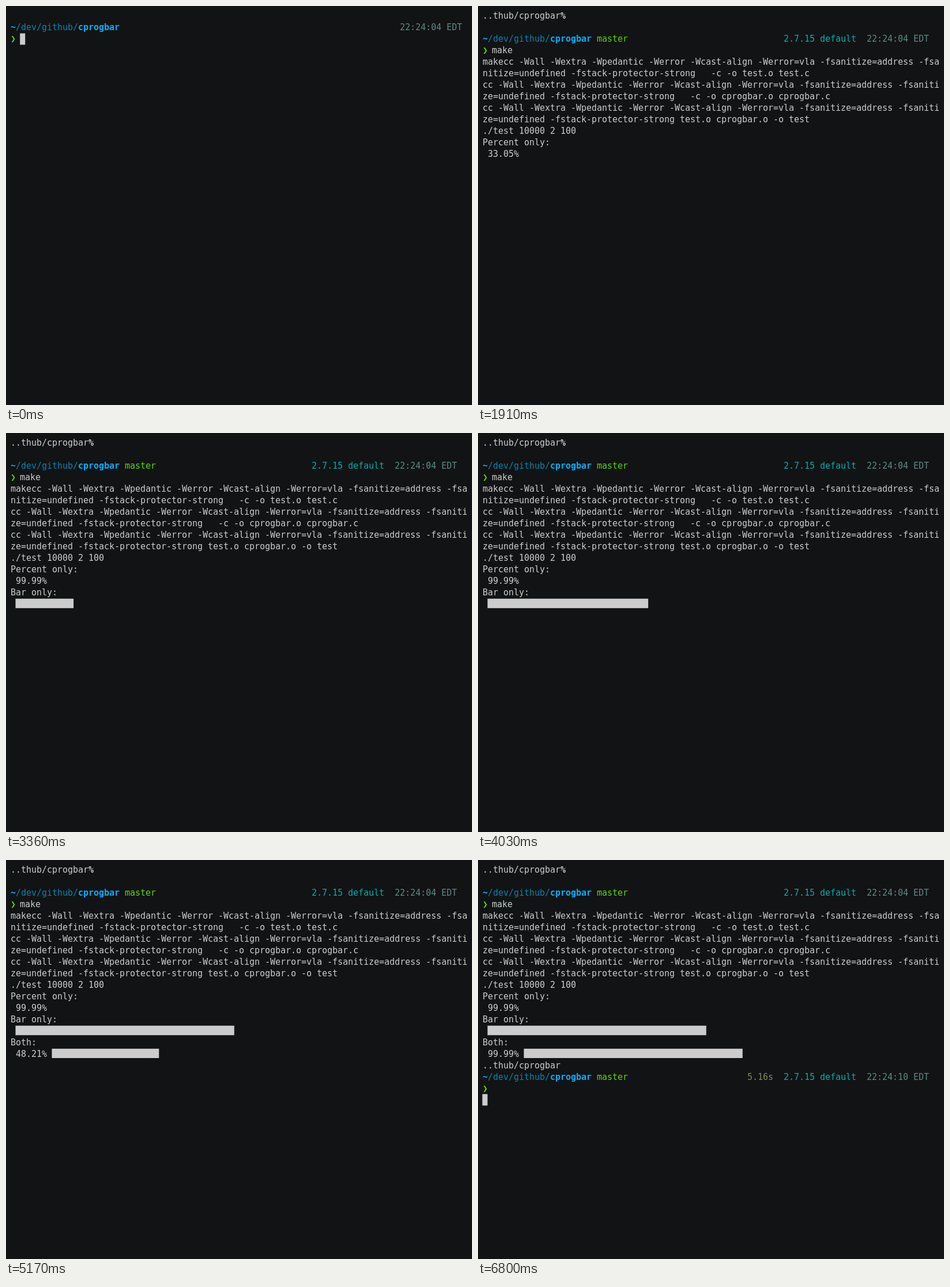
Write an HTML page that moves like this. It is 808 px wide and 693 px high and loops after 7.8 s.

```html
<!DOCTYPE html>
<html lang="en">
<head>
<meta charset="utf-8">
<title>Terminal progress bar</title>
<style>
  html, body { margin: 0; width: 100%; height: 100%; overflow: hidden; background: #121314; }
  #screen {
    position: absolute; left: 8px; top: 0; color: #ccc;
    font: 15px/18px "DejaVu Sans Mono", "Liberation Mono", monospace;
    font-variant-ligatures: none;
  }
  .row { position: absolute; left: 0; white-space: pre; }
  svg { position: absolute; left: 0; top: 0; fill: #ccc; }
  b { font-weight: bold; }
  .home { color: #00afff; }
  .path { color: #0087af; }
  .git { color: #5fd700; }
  .env { color: #00afaf; }
  .clock { color: #5f8787; }
  .took { color: #87875f; }
  .arrow { display: inline-block; width: 7px; color: #5fd700; font-weight: bold; }
</style>
</head>
<body>
<div id="screen"></div>
<svg width="808" height="693"><path id="bars"/><path id="cursor"/></svg>
<script>
const LOOP = 7800, CELL = 9, LINE = 19.95, PAD = 7.5, BLOCK = 7.74;
const PERCENT_PER_MS = 0.06687;
const screen = document.getElementById('screen');
const cursor = document.getElementById('cursor');
const bars = document.getElementById('bars');

// Keep the characters on the terminal's grid whatever the font hinting does.
const probe = document.createElement('span');
probe.className = 'row';
probe.textContent = '0'.repeat(100);
screen.append(probe);
screen.style.letterSpacing = CELL - probe.getBoundingClientRect().width / 100 + 'px';
probe.remove();

// Whole-pixel tops keep every baseline on the nearest pixel.
const rows = Array.from({ length: 21 }, (_, i) => {
  const row = document.createElement('div');
  row.className = 'row';
  row.style.top = Math.round(PAD + i * LINE + (LINE - 18) / 2) + 'px';
  screen.append(row);
  return row;
});

const span = (name, text) => `<span class="${name}">${text}</span>`;
const gap = n => ' '.repeat(n);
const dir = '<b class="home">~</b>' + span('path', '/dev/github/') + '<b class="home">cprogbar</b>';
const arrow = span('arrow', '❯') + ' ';
const gitDir = dir + ' ' + span('git', 'master');
const status = time => span('env', '2.7.15 default') + gap(2) + span('clock', time + ' EDT');

const flags = '-Wall -Wextra -Wpedantic -Werror -Wcast-align -Werror=vla -fsanitize=address ';
const compile = [flags + '-fsa', 'nitize=undefined -fstack-protector-strong   -c -o test.o test.c'];
const compileLib = ['cc ' + flags + '-fsaniti', 'ze=undefined -fstack-protector-strong   -c -o cprogbar.o cprogbar.c'];
const link = ['cc ' + flags + '-fsaniti', 'ze=undefined -fstack-protector-strong test.o cprogbar.o -o test'];

const runs = [
  { title: 'Percent only:', start: 1415.8, row: 11, percent: true },
  { title: 'Bar only:', start: 2953, row: 13, barCol: 1 },
  { title: 'Both:', start: 4449, row: 15, percent: true, barCol: 8 }
];

// Redraw times: [first, last] with a redraw every 60 ms in between.
const redraws = [[0, 0], [200, 200], [460, 460], [520, 520], [1180, 1180], [1240, 1240],
  [1370, 1910], [2040, 3900], [4030, 6010], [6800, 6800]];

function redrawTime(t) {
  const [first, last] = redraws.filter(r => r[0] <= t).pop();
  return Math.min(last, first + 60 * Math.floor((t - first) / 60));
}

const box = (x, y, w, h) => `M${x.toFixed(2)} ${y.toFixed(2)}h${w}v${h}h${-w}z`;

function barPath(col, row, count) {
  return Array.from({ length: count }, (_, i) =>
    box(PAD + col * CELL + i * BLOCK, PAD + row * LINE + 1, BLOCK, 16.4)).join('');
}

function terminal(t) {
  const lines = [], blocks = [];
  let at = null;
  const put = (row, ...text) => text.forEach((s, i) => lines[row + i] = s);
  const prompt = (row, typed) => [row, BLOCK + (1 + typed) * CELL];

  if (t < 200) {
    put(1, dir + gap(54) + span('clock', '22:24:04 EDT'), arrow);
    return { lines, blocks, at: prompt(2, 0) };
  }
  const typed = t < 460 ? 0 : t < 520 ? 1 : t < 1180 ? 3 : 4;
  put(0, '..thub/cprogbar<b>%</b>');
  put(2, gitDir + gap(30) + status('22:24:04'), arrow + 'make'.slice(0, typed));
  at = prompt(3, typed);

  if (t >= 1180) { put(4, 'make'); at = [4, 4 * CELL]; }
  if (t >= 1240) { put(4, 'make' + 'cc ' + compile[0], compile[1]); at = [6, 0]; }
  if (t >= 1370) { put(6, ...compileLib); at = [8, 0]; }
  if (t >= 1430) { put(8, ...link, './test 10000 2 100'); at = null; }

  for (const run of runs) {
    const percent = Math.min(99.99, (t - run.start) * PERCENT_PER_MS);
    if (percent < 0.5) break;
    put(run.row, run.title, run.percent ? percent.toFixed(2).padStart(6) + '%' : '');
    if (run.barCol) blocks.push([run.barCol, run.row + 1, Math.floor(percent / 2)]);
  }

  if (t >= 6010) {
    put(17, '..thub/cprogbar', gitDir + gap(23) + span('took', '5.16s') + gap(2) + status('22:24:10'), arrow);
    at = t < 6800 ? prompt(19, 0) : [20, 0];
  }
  return { lines, blocks, at };
}

let shown = -1;
function draw(t) {
  if (t === shown) return;
  shown = t;
  const { lines, blocks, at } = terminal(t);
  rows.forEach((row, i) => row.innerHTML = lines[i] || '');
  bars.setAttribute('d', blocks.map(b => barPath(...b)).join(''));
  cursor.setAttribute('d', at ? box(PAD + at[1], PAD + at[0] * LINE, CELL, LINE) : '');
}

const begin = performance.now();
function tick() {
  draw(redrawTime((performance.now() - begin) % LOOP));
  requestAnimationFrame(tick);
}
tick();
</script>
</body>
</html>
```
